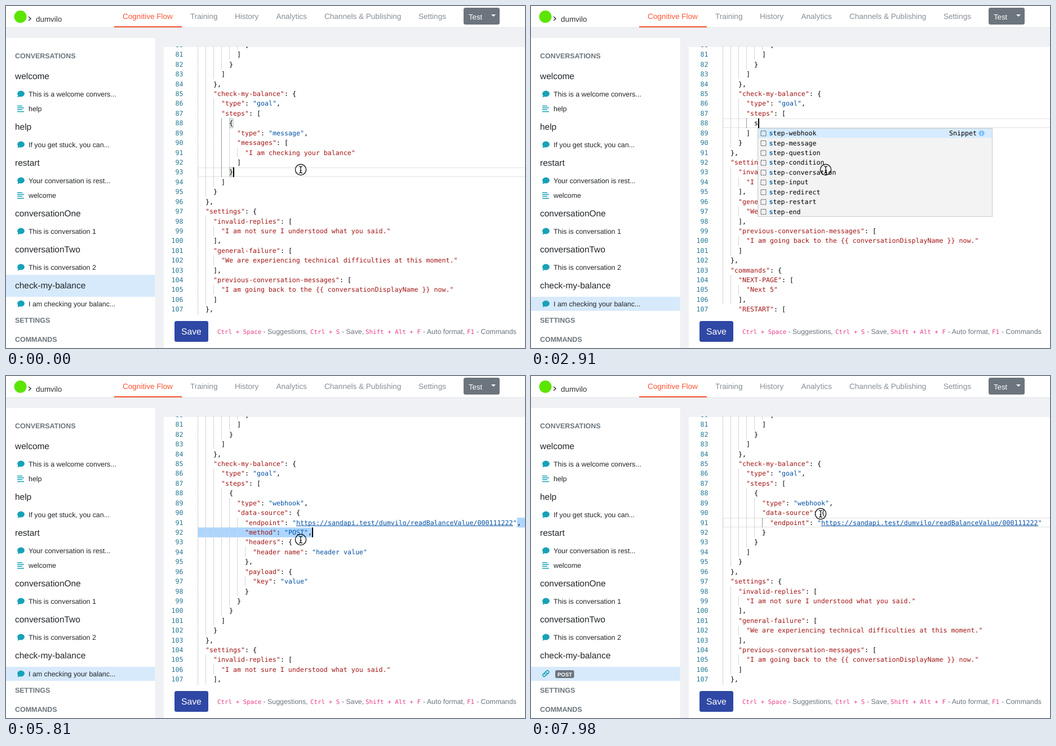
An HTML page for the animation above (8000 ms loop, 921 by 608 pixels).

```html
<!DOCTYPE html>
<html lang="en">
<head>
<meta charset="utf-8">
<title>Conversation editor</title>
<style>
  html, body { margin: 0; width: 100%; height: 100%; overflow: hidden; background: #fff; }
  svg { display: block; }
  text { font-family: "Liberation Sans", Arial, sans-serif; text-rendering: geometricPrecision; white-space: pre; }
  .nav text { font-size: 13.55px; fill: #868e96; }
  .nav .on { fill: #ff5533; }
  .cap { font-size: 12.45px; font-weight: bold; fill: #6c757d; }
  .name { font-size: 15.45px; fill: #212529; }
  .item { font-size: 12.4px; fill: #212529; }
  .hint { font-size: 12.36px; fill: #6c757d; }
  .keys { font: 10.85px "DejaVu Sans Mono", monospace; fill: #e83e8c; }
  .code text { font: 11.627px "DejaVu Sans Mono", monospace; }
  .code .num { fill: #237893; text-anchor: end; }
  .red { fill: #a31515; }
  .blue { fill: #0451a5; }
  .code .hit { fill: #0070c8; font-weight: bold; }
  .pick { fill: #d6ebff; }
  .teal { fill: #17a2b8; }
</style>
</head>
<body>
<svg width="921" height="608" viewBox="0 0 921 608">
  <defs>
    <clipPath id="pane"><rect x="280" y="72" width="641" height="477"/></clipPath>
    <g id="bubble" class="teal">
      <ellipse cx="26.5" cy="-.5" rx="6.4" ry="5.4"/>
      <path d="M21.5 1.5Q21.5 4.5 20 5.8Q23 5.8 25.5 4Z"/>
    </g>
    <path id="bars" class="teal" d="M20 -5.5h9v1.5h-9zM20 -2.2h12v1.5h-12zM20 1.1h9v1.5h-9zM20 4.4h12v1.5h-12z"/>
    <g id="chain" fill="none" stroke="#17a2b8" stroke-width="1.7" stroke-linecap="round">
      <path d="M25 1.5a2.6 2.6 0 0 1 0-3.6l2.4-2.4a2.5 2.5 0 0 1 3.6 3.6l-1.4 1.4"/>
      <path d="M27.600-1.500a2.600 2.600 0 0 1 0 3.600l-2.400 2.400a2.500 2.500 0 0 1-3.600-3.600l1.400-1.400"/>
    </g>
  </defs>

  <rect width="921" height="608" fill="#f0f1f4"/>
  <rect width="921" height="38" fill="#fff"/>
  <rect y="38" width="921" height="1" fill="#dfe1e5"/>
  <circle cx="25.500" cy="19" r="11" fill="#5ce500"/>
  <path d="M40 19l4 3.500-4 3.500" fill="none" stroke="#333" stroke-width="1.500"/>
  <text x="53" y="28" font-size="13.400" fill="#333">dumvilo</text>
  <g class="nav">
    <text class="on" x="207" y="23">Cognitive Flow</text>
    <text x="327" y="23">Training</text>
    <text x="406" y="23">History</text>
    <text x="479.500" y="23">Analytics</text>
    <text x="565" y="23">Channels &amp; Publishing</text>
    <text x="732" y="23">Settings</text>
  </g>
  <rect x="192" y="36" width="120" height="2" fill="#ff5533"/>
  <rect x="812" y="3" width="64" height="30" rx="3.500" fill="#6c757d"/>
  <text x="821" y="23.500" font-size="13.200" fill="#fff">Test</text>
  <path d="M861 15h8l-4 4z" fill="#fff"/>

  <rect y="57" width="264.500" height="551" fill="#fff"/>
  <g id="side"></g>

  <rect x="280" y="73" width="641" height="535" fill="#fff"/>
  <g clip-path="url(#pane)"><g class="code" id="code"></g></g>

  <rect x="299" y="560" width="60" height="37" rx="3.500" fill="#2f48a5"/>
  <text x="311" y="584" font-size="15.700" fill="#fff">Save</text>
  <g id="hints"></g>

  <g id="mouse" fill="none" stroke="#000">
    <circle r="9.600" stroke-width="1.200"/>
    <path d="M-3 -6Q0 -6 0 -4V4Q0 6 -3 6M3 -6Q0 -6 0 -4M0 4Q0 6 3 6M-1.500 1.500H1.500" stroke-width="1.200"/>
  </g>
</svg>

<script>
const LOOP = 8000, FIRST = 80, X0 = 340, CH = 7, LH = 17.42;
const URL_TEXT = 'https://sandapi.test/dumvilo/readBalanceValue/000111222';
const $ = id => document.getElementById(id);
const rows = s => s.split('\n').slice(1, -1);
const colX = c => X0 + c * CH;
const lineY = n => 286.7 + (n - 93) * LH;
const indent = s => s.search(/\S|$/);

const text = (x, y, s, cls = '') => `<text x="${x}" y="${y}" class="${cls}">${s}</text>`;
const rect = (x, y, w, h, fill) => `<rect x="${x}" y="${y}" width="${w}" height="${h}" fill="${fill}"/>`;
const icon = (id, y) => `<use href="#${id}" y="${y}"/>`;

const head = rows(`
            ]
          ]
        }
      ]
    },
    "check-my-balance": {
      "type": "goal",
      "steps": [
`);
const message = rows(`
        {
          "type": "message",
          "messages": [
            "I am checking your balance"
          ]
        }
`);
const tail = rows(`
      ]
    }
  },
  "settings": {
    "invalid-replies": [
      "I am not sure I understood what you said."
    ],
    "general-failure": [
      "We are experiencing technical difficulties at this moment."
    ],
    "previous-conversation-messages": [
      "I am going back to the {{ conversationDisplayName }} now."
    ]
  },
  "commands": {
    "NEXT-PAGE": [
      "Next 5"
    ],
    "RESTART": [
`);
const extras = rows(`
            "method": "POST",
            "headers": {
              "header name": "header value"
            },
            "payload": {
              "key": "value"
            }
`);
const webhook = (url, full) => [
  '        {', '          "type": "webhook",', '          "data-source": {',
  `            "endpoint": "${url}"${full ? ',' : ''}`,
  ...(full ? extras : []), '          }', '        }'];
const wrap = mid => [...head, ...mid, ...tail];
const typed = w => wrap([' '.repeat(8) + w]);

const snippets = ['webhook', 'message', 'question', 'condition', 'conversation',
  'input', 'redirect', 'restart', 'end'].map(s => 'step-' + s);

// Each entry changes the editor state from its time on.
const script = [
  [0, { doc: wrap(message), cur: [93, 9], sel: null, caret: 1, pair: 1, side: 0, marks: '', link: 0, word: '' }],
  [50, { caret: 0 }],
  [530, { caret: 1 }],
  [1070, { caret: 0 }],
  [1310, { caret: 1, sel: [93, 9], cur: [92, 9] }],
  [1370, { pair: 0 }],
  [1430, { cur: [91, 9] }],
  [1580, { cur: [90, 9] }],
  [1730, { cur: [89, 9] }],
  [1840, { cur: [88, 9] }],
  [2080, { cur: [88, 8] }],
  [2140, { side: 1 }],
  [2590, { doc: typed(''), sel: null }],
  [2820, { doc: typed('s'), cur: [88, 9] }],
  [2910, { word: 's' }],
  [3060, { doc: typed('st'), cur: [88, 10], word: 'st' }],
  [3510, { doc: typed('stw'), cur: [88, 11], word: 'stw' }],
  [3590, { doc: typed('stwe'), cur: [88, 12] }],
  [3680, { word: 'stwe' }],
  [4090, { doc: wrap(webhook('endpoint', 1)), word: '', sel: [91, 25], cur: [91, 33] }],
  [4160, { marks: 'endpoint' }],
  [4720, { caret: 0 }],
  [4890, { doc: wrap(webhook(URL_TEXT, 1)), caret: 1, sel: null, cur: [91, 80], marks: URL_TEXT }],
  [5370, { cur: [91, 81], marks: '' }],
  [5460, { link: 1 }],
  [5810, { sel: [91, 81], cur: [92, 29] }],
  [5900, { cur: [93, 24] }],
  [5990, { cur: [94, 43] }],
  [6080, { side: 2 }],
  [6220, { cur: [95, 14] }],
  [6340, { cur: [96, 24] }],
  [6520, { cur: [97, 28] }],
  [6880, { cur: [98, 13] }],
  [7300, { doc: wrap(webhook(URL_TEXT, 0)), sel: null, cur: [91, 81] }],
  [7840, { caret: 0 }]
];

function tokens(line, y) {
  let out = '', col = 0;
  for (const part of line.match(/"[^"]*"|[^"]+/g) || []) {
    const end = col + part.length, pad = indent(part);
    const value = line.slice(0, col).endsWith(': ') && line[end] !== ':';
    const cls = part[0] !== '"' ? '' : value ? 'blue' : 'red';
    if (part.trim()) out += text(colX(col + pad), y, part.trim(), cls);
    col = end;
  }
  return out;
}

function selection({ doc, sel, cur }) {
  const [a, b] = [sel, cur].sort((p, q) => p[0] - q[0] || p[1] - q[1]);
  let out = '';
  for (let n = a[0]; n <= b[0]; n++) {
    const from = n === a[0] ? a[1] : 0;
    const to = n === b[0] ? b[1] : doc[n - FIRST].length + 1;
    out += rect(colX(from), lineY(n), (to - from) * CH, LH + .1, '#add6ff');
  }
  return out;
}

function guides({ doc, sel, cur }) {
  const level = i => (doc[i].trim() ? indent(doc[i]) : indent(doc[i + 1])) / 2;
  const at = cur[0] - FIRST, depth = level(at);
  let top = at, end = at, out = '';
  while (top > 0 && level(top - 1) >= depth) top--;
  while (end < doc.length - 2 && level(end + 1) >= depth) end++;
  for (let i = 0; i < doc.length - 1; i++)
    for (let k = 0; k < level(i); k++) {
      const on = !sel && k === depth - 1 && i >= top && i <= end;
      out += rect(colX(2 * k), lineY(i + FIRST), 1, LH, on ? '#939393' : '#d3d3d3');
    }
  return out;
}

function placeholders(doc, endpoint) {
  const spots = [[91, endpoint], [92, 'POST'], [94, 'header name'], [94, 'header value'], [97, 'key'], [97, 'value']];
  return spots.map(([n, s]) =>
    rect(colX(doc[n - FIRST].lastIndexOf(s)), lineY(n), s.length * CH, LH, '#0a326433')).join('')
    + rect(402.5, lineY(100), 1.5, LH, '#0a326499');
}

function popup(word) {
  const list = word.length > 2 ? snippets.slice(0, 1) : snippets;
  const x = colX(8 + word.length) - .5, y = lineY(89);
  let out = `<rect x="${x}" y="${y + .5}" width="416" height="${list.length * LH}" fill="#f3f3f3" stroke="#c8c8c8"/>`;
  list.forEach((name, i) => {
    const ry = y + i * LH + .5, base = ry + 12.7;
    if (!i) {
      out += `<rect class="pick" x="${x + .5}" y="${ry + .5}" width="415" height="${LH - 1}"/>`
        + text(x + 339.5, base, 'Snippet')
        + `<circle cx="${x + 397}" cy="${ry + 8.7}" r="5" fill="#75beff"/>`
        + rect(x + 396.3, ry + 7.7, 1.4, 4, '#fff') + rect(x + 396.3, ry + 5.3, 1.4, 1.4, '#fff');
    }
    out += `<rect x="${x + 5.5}" y="${ry + 4.5}" width="9" height="9" fill="none" stroke="#424242" stroke-dasharray="2 1"/>`;
    let k = 0;
    [...name].forEach((c, j) => {
      const hit = c === word[k];
      if (hit) k++;
      out += text(x + 20 + j * CH, base, c, hit ? 'hit' : '');
    });
  });
  return out;
}

function drawCode(s) {
  const { doc, cur, sel } = s;
  let out = sel ? selection(s)
    : `<rect x="341" y="${lineY(cur[0]) + .8}" width="590" height="${LH - 1.6}" fill="none" stroke="#eaeaea" stroke-width="1.6"/>`;
  if (s.marks) out += placeholders(doc, s.marks);
  out += guides(s);
  if (s.pair) for (const n of [88, 93])
    out += `<rect x="396.5" y="${lineY(n) + .5}" width="6.5" height="${LH - 1}" fill="#e4ece4" stroke="#b9b9b9"/>`;
  doc.forEach((line, i) => {
    const y = lineY(i + FIRST) + 12.7;
    out += text(314.5, y, i + FIRST, 'num') + tokens(line, y);
  });
  if (s.link) out += rect(colX(25), lineY(91) + 14, URL_TEXT.length * CH, 1, '#0451a5');
  if (s.caret) out += rect(colX(cur[1]), lineY(cur[0]), 2, LH, '#000');
  if (s.word) out += popup(s.word);
  $('code').innerHTML = out;
}

function drawSide(mode) {
  const cap = (y, s) => text(16, y + 4.4, s, 'cap');
  const name = (y, s) => text(16, y + 5.3, s, 'name');
  const say = (y, s) => icon('bubble', y) + text(40, y + 4.3, s, 'item');
  const go = (y, s) => icon('bars', y) + text(40, y + 4.3, s, 'item');
  const post = icon('chain', 529) + '<rect x="43" y="523" width="33.500" height="14" rx="3" fill="#6c757d"/>'
    + '<text x="47" y="533.700" font-size="9.500" font-weight="bold" fill="#fff">POST</text>';
  $('side').innerHTML = (mode ? rect(0, 517, 264.5, 25, '#d7eafc') : rect(0, 478, 264.5, 39, '#d7eafc'))
    + cap(88.5, 'CONVERSATIONS')
    + name(124.5, 'welcome') + say(156.5, 'This is a welcome convers...') + go(182.5, 'help')
    + name(214.5, 'help') + say(246.5, 'If you get stuck, you can...')
    + name(278.5, 'restart') + say(310.5, 'Your conversation is rest...') + go(336.5, 'welcome')
    + name(368.5, 'conversationOne') + say(400.5, 'This is conversation 1')
    + name(432.5, 'conversationTwo') + say(464.5, 'This is conversation 2')
    + name(497, 'check-my-balance') + (mode === 2 ? post : say(529.5, 'I am checking your balanc...'))
    + cap(559, 'SETTINGS') + cap(593, 'COMMANDS');
}

$('hints').innerHTML = [
  [375, 'Ctrl + Space', 456.5, '- Suggestions,'], [540, 'Ctrl + S', 596, '- Save,'],
  [638, 'Shift + Alt + F', 740, '- Auto format,'], [818, 'F1', 835, '- Commands']
].map(([x, k, x2, s]) => text(x, 583, k, 'keys') + text(x2, 583, s, 'hint')).join('');

// The pointer swings left and up in six steps.
function moveMouse(t) {
  const k = t < 7630 ? 0 : Math.min(6, Math.floor((t - 7630) / 70) + 1) / 6;
  const bend = (a, b, c) => (1 - k) ** 2 * a + 2 * k * (1 - k) * b + k * k * c;
  $('mouse').setAttribute('transform', `translate(${bend(523, 333, 514)} ${bend(291, 262, 245)})`);
}

let shown = -1;
function frame(now) {
  const t = now % LOOP;
  const past = script.filter(e => e[0] <= t);
  if (past.length !== shown) {
    shown = past.length;
    const state = Object.assign({}, ...past.map(e => e[1]));
    drawCode(state);
    drawSide(state.side);
  }
  moveMouse(t);
}

const start = performance.now();
function tick() {
  frame(performance.now() - start);
  requestAnimationFrame(tick);
}
tick();
</script>
</body>
</html>
```
